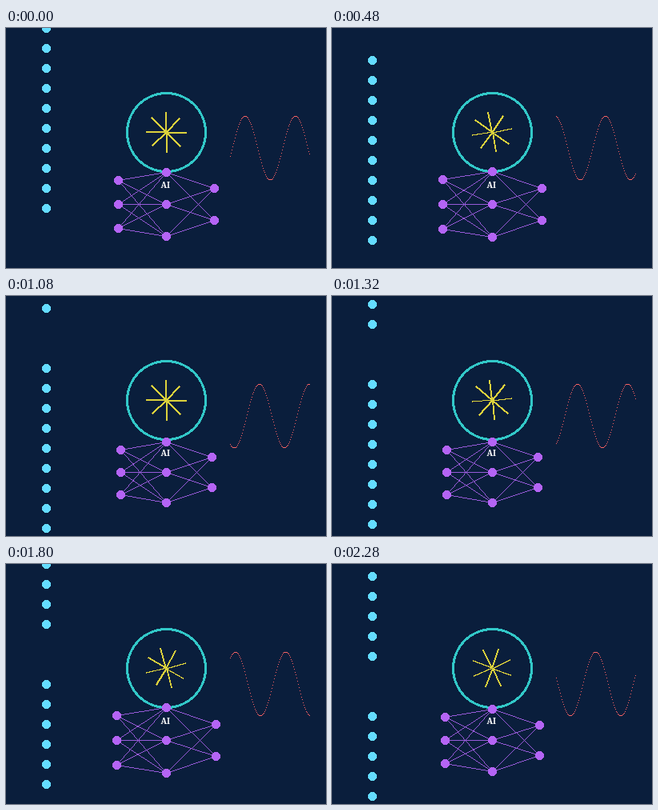
Write an HTML page with a canvas that moves like this. It is 400 px wide and 300 px high and loops after 2.4 s.

```html
<!DOCTYPE html>
<html lang="en">
<head>
<meta charset="utf-8">
<title>AI network loop</title>
<style>
html, body { margin: 0; width: 100%; height: 100%; overflow: hidden; background: #0a1e3c; }
canvas { display: block; }
</style>
</head>
<body>
<canvas id="stage" width="400" height="300"></canvas>
<script>
const ctx = document.getElementById('stage').getContext('2d');
const STEP = 120, STEPS = 20;
const { floor, ceil, abs, sign, trunc, sin, cos, hypot, max, min, sqrt, PI } = Math;

const color = c => { ctx.fillStyle = c; };
const pixel = (x, y) => ctx.fillRect(x, y, 1, 1);
const span = (x0, x1, y) => ctx.fillRect(x0, y, x1 - x0 + 1, 1);
const roundUp = v => sign(v) * floor(abs(v) + 0.5);
const roundDown = v => sign(v) * ceil(abs(v) - 0.5);

// Hard-edged disc, 11 pixels wide
function dot(x, y) {
  for (let d = -5; d <= 5; d++) {
    const w = min(5, floor(sqrt(30.25 - d * d)));
    span(x - w, x + w, y + d);
  }
}

function ring(cx, cy, outer, inner) {
  for (let y = -50; y <= 50; y++)
    for (let x = -50; x <= 50; x++) {
      const d = hypot(x, y);
      if (d <= outer && d > inner) pixel(cx + x, cy + y);
    }
}

// Hard-edged line, one pixel wide
function thinLine([x0, y0], [x1, y1]) {
  const dx = x1 - x0, dy = y1 - y0, n = max(abs(dx), abs(dy));
  for (let i = 0; i <= n; i++)
    pixel(x0 + roundUp(i * dx / n), y0 + roundUp(i * dy / n));
}

// Hard-edged line, two pixels wide, filled row by row
function thickLine(x0, y0, x1, y1) {
  const dx = x1 - x0, dy = y1 - y0, len = hypot(dx, dy);
  const ox = roundDown(dy / len), oy = roundUp(dx / len);
  const pts = [[x0, y0 + oy], [x1, y1 + oy], [x1 + ox, y1], [x0 + ox, y0]];
  const ys = pts.map(p => p[1]);
  for (let y = min(...ys); y <= max(...ys); y++) {
    const xs = [];
    pts.forEach(([ax, ay], i) => {
      const [bx, by] = pts[(i + 1) % 4];
      if (y < min(ay, by) || y > max(ay, by)) return;
      if (ay === by) xs.push(ax, bx);
      else xs.push(ax + (y - ay) * (bx - ax) / (by - ay));
    });
    const left = roundUp(min(...xs));
    span(left, max(left, roundDown(max(...xs))), y);
  }
}

function network(n) {
  const scale = 1 + 0.05 * sin(n * 0.5);
  const layer = (x, ys) => ys.map(y => [200 + trunc(x * scale), 220 + trunc(y * scale)]);
  const layers = [layer(-60, [-30, 0, 30]), layer(0, [-40, 0, 40]), layer(60, [-20, 20])];
  color('#965ad8');
  for (let i = 0; i < 2; i++)
    for (const a of layers[i])
      for (const b of layers[i + 1]) thinLine(a, b);
  color('#b464f5');
  layers.flat().forEach(p => dot(...p));
}

function draw(n) {
  color('#0a1e3c');
  ctx.fillRect(0, 0, 400, 300);

  color('#64dcff');
  for (let i = 0; i < 10; i++) dot(50, (i * 25 + n * 10) % 300);

  color('#32c8c8');
  ring(200, 130, 50.5, 47.5);

  color('#dcd23c');
  for (let i = 0; i < 8; i++) {
    const a = (i * 45 + n * 20) * PI / 180;
    thickLine(200, 130, trunc(200 + 25 * cos(a)), trunc(130 + 25 * sin(a)));
  }

  color('#ff6464');
  for (let x = 280; x < 380; x++) pixel(x, trunc(150 + 40 * sin(x / 10 + n * 0.5)));

  network(n);

  color('#fff');
  ctx.font = 'bold 10px "Noto Serif", "Liberation Serif", serif';
  ctx.fillText('AI', 193.5, 200);
}

const start = performance.now();
let shown = -1;
function tick() {
  const n = floor((performance.now() - start) / STEP) % STEPS;
  if (n !== shown) draw(shown = n);
  requestAnimationFrame(tick);
}
tick();
</script>
</body>
</html>
```
